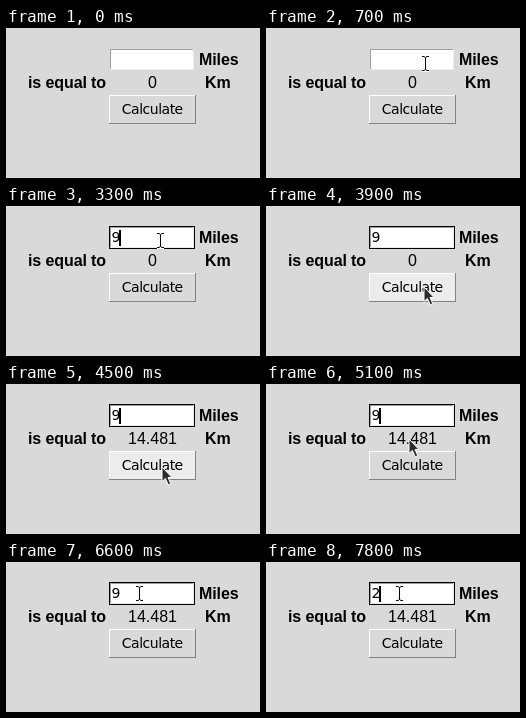
An HTML page that plays this animation: 254 px wide and 150 px high, repeating every 8 s.

```html
<!DOCTYPE html>
<html lang="en">
<head>
<meta charset="utf-8">
<title>Miles to Km</title>
<style>
  html, body { margin: 0; width: 100%; height: 100%; overflow: hidden; background: #d9d9d9; }
  svg { display: block; width: 100%; height: 100%; }
  text { font: 16px "Liberation Sans", sans-serif; text-anchor: middle; }
  .bold { font-weight: bold; text-anchor: start; letter-spacing: -.1px; }
  .ui { font: 14px "DejaVu Sans", sans-serif; letter-spacing: -.5px; }
  #entry { text-anchor: start; }
  rect { shape-rendering: crispEdges; }
</style>
</head>
<body>
<svg viewBox="0 0 254 150">
  <defs><path id="bar" d="M-3 -7.5H-1L.5 -6.5L2 -7.5H4M-3 6.5H-1L.5 5.5L2 6.5H4M.5 -6.5V5.5"/></defs>
  <rect width="254" height="150" fill="#d9d9d9"/>

  <rect id="ring" x="103" y="20" width="86" height="23"/>
  <g id="field"></g>
  <text id="entry" class="ui" x="105.5" y="36"></text>
  <rect id="caret" y="24" width="2" height="16"/>

  <text class="bold" x="193" y="37">Miles</text>
  <text class="bold" x="22" y="60">is equal to</text>
  <text id="result" x="146.5" y="60"></text>
  <text class="bold" x="199" y="60">Km</text>

  <g id="button"></g>
  <text id="label" class="ui" x="146.3" y="86">Calculate</text>

  <path id="arrow" d="M0 0V14.5L3.4 11.4L6.2 17.8L8.8 16.7L6 10.5H10Z"
        fill="#2b2b2b" stroke="#fff" stroke-linejoin="round"/>
  <g id="beam" fill="none">
    <use href="#bar" stroke="#fff" stroke-width="3"/>
    <use href="#bar" stroke="#000"/>
  </g>
</svg>
<script>
const LOOP = 8000, STEP = 100;
const APPEAR = 400, FOCUS = 1500, TYPE = 3300, PRESS = 4300, RELEASE = 4400,
      ERASE = 6800, RETYPE = 7700;
const FIELD = { x: 104, y: 21, w: 84, h: 21 };
const BUTTON = { x: 103, y: 67, w: 87, h: 29 };
const home = { x: 216, y: 107 };
const moves = [
  { from: 500, to: 700, x: 159, y: 36 },
  { from: 700, to: 1100, x: 154, y: 35 },
  { from: 3700, to: 3900, x: 158, y: 81 },
  { from: 3900, to: 4000, x: 156, y: 83 },
  { from: 4900, to: 5500, x: 133, y: 32 }
];

const $ = id => document.getElementById(id);
const set = (id, name, value) => $(id).setAttribute(name, value);
const show = (id, on) => set(id, "visibility", on ? "visible" : "hidden");
const place = (id, x, y) => set(id, "transform", `translate(${x} ${y})`);
const inside = (p, b) => p.x >= b.x && p.x < b.x + b.w && p.y >= b.y && p.y < b.y + b.h;

// A one-pixel bevel: far edges, near edges, then the face on top.
function bevel(id, { x, y, w, h }, near, far, face) {
  const rect = (dx, dy, dw, dh, color) =>
    `<rect x="${x + dx}" y="${y + dy}" width="${w - dw}" height="${h - dh}" fill="${color}"/>`;
  $(id).innerHTML = rect(0, 0, 0, 0, far) + rect(0, 0, 1, 1, near) + rect(1, 1, 2, 2, face);
}

function pointerAt(t) {
  return moves.reduce((p, m) => {
    const k = Math.min(1, Math.max(0, (t - m.from) / (m.to - m.from)));
    const ease = 1 - (1 - k) ** 2;
    return { x: p.x + (m.x - p.x) * ease, y: p.y + (m.y - p.y) * ease };
  }, home);
}

function draw(time) {
  const t = Math.floor(time / STEP) * STEP;
  const during = (a, b) => t >= a && t < b;
  const p = pointerAt(t);
  const value = during(TYPE, ERASE) ? "9" : t >= RETYPE ? "2" : "";
  const focused = t >= FOCUS, pressed = during(PRESS, RELEASE);

  show("ring", focused);
  $("entry").textContent = value;
  set("caret", "x", 105 + 8 * value.length);
  show("caret", focused && (t - FOCUS) % 900 < 600);
  $("result").textContent = t >= RELEASE ? "14.481" : "0";

  const edges = pressed ? ["#828282", "#fff"] : ["#fff", "#828282"];
  bevel("button", BUTTON, ...edges, inside(p, BUTTON) ? "#ececec" : "#d9d9d9");
  place("label", +pressed, +pressed);

  const overField = inside(p, FIELD), visible = t >= APPEAR;
  show("beam", visible && overField);
  show("arrow", visible && !overField);
  place(overField ? "beam" : "arrow", Math.round(p.x), Math.round(p.y));
}

bevel("field", FIELD, "#a0a0a0", "#ececec", "#fff");
const start = performance.now();
function tick() {
  draw((performance.now() - start) % LOOP);
  requestAnimationFrame(tick);
}
tick();
</script>
</body>
</html>
```
